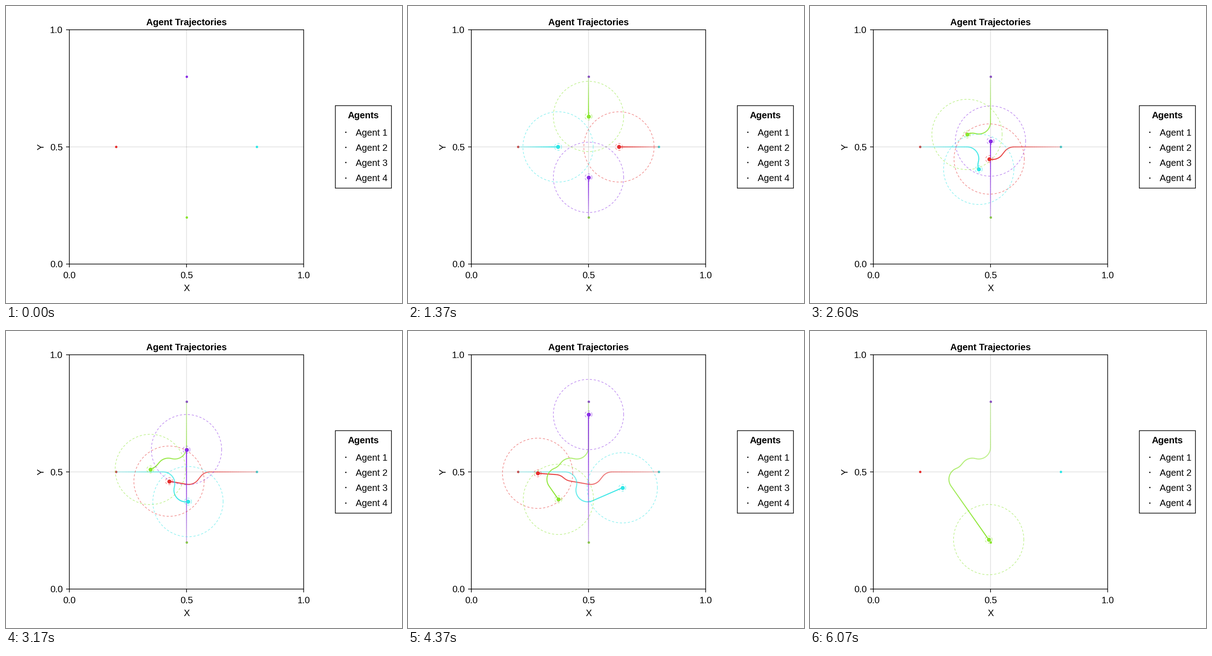
Recreate the animation shown at these times as a matplotlib script. Size 864x648 px, loop 6100 ms.

```python
import colorsys

import matplotlib.pyplot as plt
import numpy as np
from matplotlib.animation import FuncAnimation
from matplotlib.collections import LineCollection
from matplotlib.patches import Rectangle

FRAMES, FRAME_MS = 305, 20
UNIT = 1.44                                # pixels per layout unit
LEFT, BOTTOM, SIDE = 96 * UNIT, 391 * UNIT, 355 * UNIT
STEP, TURN = 0.005, 0.1                    # distance and largest turn per step
ARRIVED = 0.009

plt.rcParams["font.family"] = "Liberation Sans"
plt.rcParams["font.size"] = 14 * UNIT

fig = plt.figure(figsize=(12, 9), dpi=72, facecolor="white")
ax = fig.add_axes([0, 0, 1, 1])
ax.set(xlim=(0, 864), ylim=(648, 0))
ax.axis("off")


def to_px(x, y):
    return LEFT + SIDE * x, BOTTOM - SIDE * y


def line(xs, ys, **kw):
    return ax.plot(xs, ys, **{"lw": UNIT, "color": "black", "snap": False, **kw})[0]


def label(x, y, text, **kw):
    ax.text(x, y, text, **{"ha": "center", "va": "baseline", **kw})


def box(x, y, w, h):
    ax.add_patch(Rectangle((x, y), w, h, fill=False, lw=UNIT, snap=False, zorder=7))


def walk(start, goal, dodges):
    """Steer to the goal at limited turn rate; dodges are (first step, steps, turn)."""
    swerve = {k: turn for first, steps, turn in dodges
              for k in range(first, first + steps)}
    pos, goal = complex(*start), complex(*goal)
    heading = np.angle(goal - pos)
    path = []
    while abs(goal - pos) > ARRIVED:
        path.append(to_px(pos.real, pos.imag))
        off = np.angle((goal - pos) * np.exp(-1j * heading))
        turn = TURN * swerve.get(len(path) - 1, np.clip(off / TURN, -1, 1))
        pos += STEP * np.exp(1j * (heading + turn / 2))
        heading += turn
    return np.array(path)


class Agent:
    def __init__(self, hue, start, goal, dodges=()):
        self.color = colorsys.hsv_to_rgb(hue, 0.8, 0.9)
        self.path = walk(start, goal, dodges)
        self.dot(*to_px(*goal), 5.3, zorder=2)
        self.origin = self.dot(*self.path[0], 5.3, alpha=0.15, zorder=3)
        self.trail = LineCollection([], linewidths=1.5 * UNIT, snap=False, zorder=4)
        ax.add_collection(self.trail)
        self.rings = [(r * SIDE, self.ring()) for r in (0.15, 0.015)]
        self.body = self.dot(0, 0, 8.8, zorder=6)
        self.parts = [self.origin, self.trail, self.body]
        self.parts += [ring for _, ring in self.rings]

    def dot(self, x, y, size, **kw):
        return line([x], [y], marker="o", ms=size, mew=0, color=self.color, **kw)

    def ring(self):
        return line([], [], lw=0.9 * UNIT, color=self.color, alpha=0.58,
                    ls=(0, (3.6, 3.1)), dash_capstyle="butt", zorder=5)

    def show(self, k):
        alive = 0 <= k < len(self.path)
        for part in self.parts:
            part.set_visible(alive)
        if not alive:
            return
        x, y = self.path[k]
        self.body.set_data([x], [y])
        t = np.linspace(0, 2 * np.pi, 181)
        for r, ring in self.rings:
            ring.set_data(x + r * np.cos(t), y - r * np.sin(t))
        a, b = self.path[:k], self.path[1:k + 1]
        # slight overlap leaves the darker joints between steps
        self.trail.set_segments(np.stack([a, b + 0.15 * (b - a)], axis=1))
        self.trail.set_color([(*self.color, v) for v in np.linspace(0.25, 1, k)])


def draw_axes():
    mid_x, mid_y = to_px(0.5, 0.5)
    right, top = to_px(1, 1)
    line([mid_x, mid_x], [top, BOTTOM], alpha=0.13, zorder=1)
    line([LEFT, right], [mid_y, mid_y], alpha=0.13, zorder=1)
    tick = 5 * UNIT
    for v in (0, 0.5, 1):
        x, y = to_px(v, v)
        line([x, x], [BOTTOM, BOTTOM + tick], solid_capstyle="butt")
        line([LEFT - tick, LEFT], [y, y], solid_capstyle="butt")
        label(x, 593.8, f"{v:.1f}")
        label(123.7, y + 7.2, f"{v:.1f}", ha="right")
    box(LEFT, top, SIDE, SIDE)
    label(mid_x, 42, "Agent Trajectories", weight="bold")
    label(mid_x, 621.8, "X")
    label(77, mid_y, "Y", rotation=90, va="center")


def draw_legend():
    x, y = 499 * UNIT, 151 * UNIT
    box(x, y, 85 * UNIT, 125 * UNIT)
    label(x + 61, y + 27.7, "Agents", weight="bold")
    for i in range(4):
        row = y + 57.8 + 23 * UNIT * i
        line([x + 22.8], [row], marker="o", ms=2 * UNIT, mew=0)
        label(x + 44.5, row + 7.6, f"Agent {i + 1}", ha="left")


draw_axes()
draw_legend()

W, E, S, N = (0.2, 0.5), (0.8, 0.5), (0.5, 0.2), (0.5, 0.8)
agents = [
    Agent(0, E, W, [(40, 9, 1), (49, 4, 0), (80, 5, -1), (85, 2, 0)]),
    Agent(0.25, N, S, [(39, 18, -1), (57, 1, 0), (69, 3, 0), (72, 5, -1)]),
    Agent(0.5, W, E, [(40, 18, -1), (58, 1, 0)]),
    Agent(0.75, S, N),
]


def update(i):
    n = (3 * i + 2) // 5          # 30 pictures per second
    k = n * 5 // 6 if n else -1   # 25 steps per second
    for agent in agents:
        agent.show(k)


anim = FuncAnimation(fig, update, frames=FRAMES, interval=FRAME_MS,
                     repeat=True, repeat_delay=0, cache_frame_data=False)
plt.show()
```
